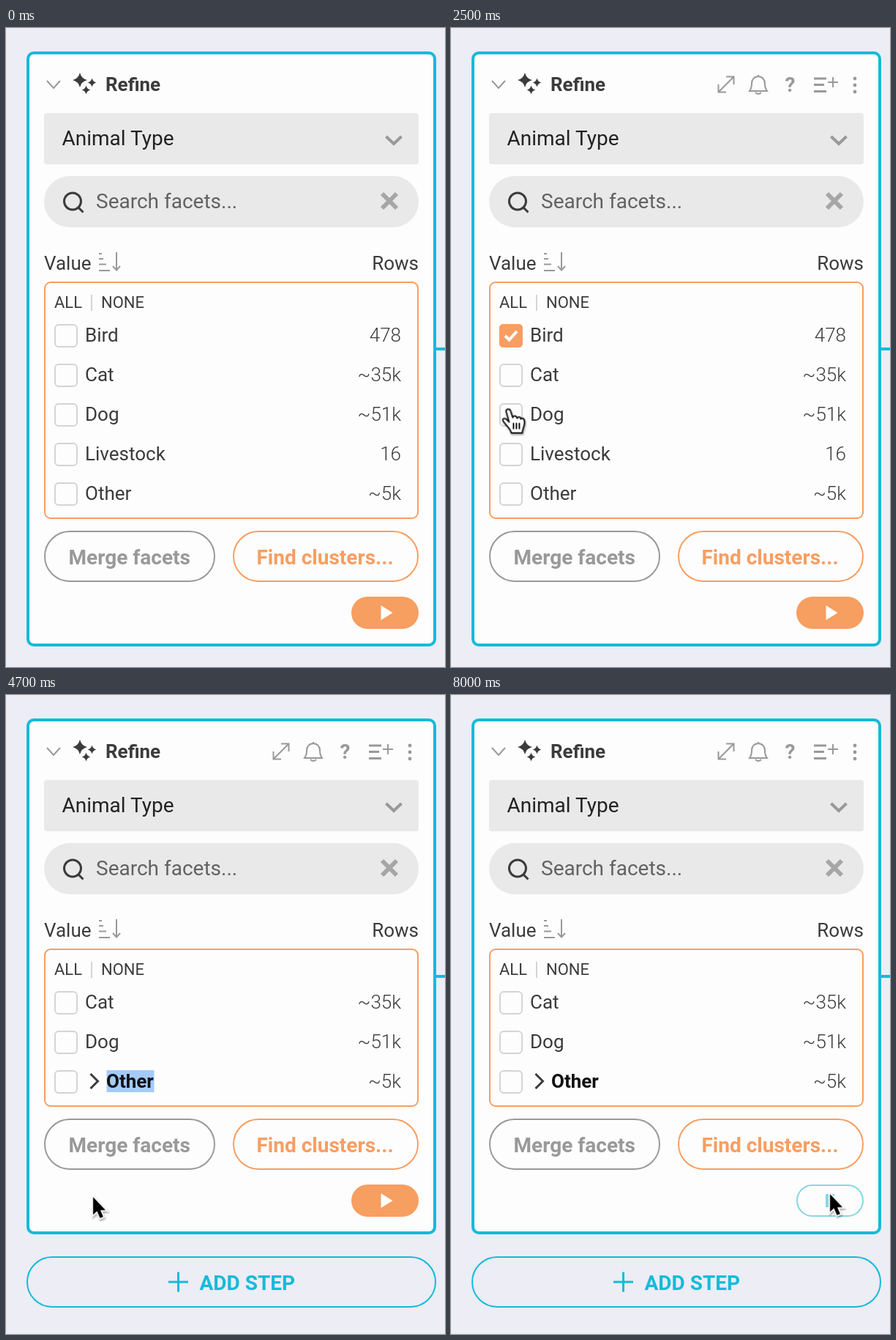
Write an HTML page that moves like this. It is 600 px wide and 872 px high and loops after 8100 ms.

```html
<!DOCTYPE html>
<html lang="en">
<head>
<meta charset="utf-8">
<title>Merging facets</title>
<style>
  :root {
    --page: #ecedf5; --card: #fdfdfd; --field: #e9e9e9;
    --cyan: #14bbd8; --orange: #f79e61; --gray: #999; --ink: #3b3b3b;
  }
  html, body { margin: 0; width: 100%; height: 100%; overflow: hidden; background: var(--page); }
  svg { display: block; width: 600px; height: 872px; }
  text { font: 400 26px Roboto, sans-serif; fill: var(--ink); }
  .big { font-size: 28px; }
  .small { font-size: 22px; }
  .bold { font-weight: 700; }
  .count { font-weight: 300; text-anchor: end; }
  .line { fill: none; stroke: var(--gray); stroke-width: 2; }
  .thick { stroke-width: 3; }
  .heavy { stroke-width: 4; }
  .orange { stroke: var(--orange); }
  .cyan { stroke: var(--cyan); }
  .dark { stroke: var(--ink); }
  .fill-orange { fill: var(--orange); }
  .fill-cyan { fill: var(--cyan); }
  .fill-gray { fill: var(--gray); }
  .fill-card { fill: var(--card); }

  /* Hard state changes, all on one clock */
  .step { animation: 8.1s step-end infinite; }
  .tools { animation-name: tools; }
  .bird { animation-name: bird; }
  .livestock { animation-name: livestock; }
  .other { animation-name: other; }
  .before { animation-name: before; }
  .after { animation-name: after; }
  .selection { animation-name: selection; }
  .hover { animation-name: hover; }
  .running { animation-name: running; }
  .hand { animation-name: hand; }
  .arrow { animation-name: arrow; }
  .frame { height: 808px; animation-name: frame; }
  .list { height: 322px; animation-name: list; }
  .footer { animation-name: footer; }
  .link { animation-name: link; }
  @keyframes tools { 0% { opacity: 0 } 8.6%, 100% { opacity: 1 } }
  @keyframes bird { 0% { opacity: 0 } 23.4%, 100% { opacity: 1 } }
  @keyframes livestock { 0% { opacity: 0 } 34.5% { opacity: 1 } 58%, 100% { opacity: 0 } }
  @keyframes other { 0% { opacity: 0 } 45.6%, 100% { opacity: 1 } }
  @keyframes before { 0% { opacity: 1 } 58%, 100% { opacity: 0 } }
  @keyframes after { 0% { opacity: 0 } 58%, 100% { opacity: 1 } }
  @keyframes selection { 0% { opacity: 0 } 58% { opacity: 1 } 70.3%, 100% { opacity: 0 } }
  @keyframes hover { 0% { opacity: 0 } 76.5% { opacity: 1 } 82.7%, 100% { opacity: 0 } }
  @keyframes running { 0% { opacity: 0 } 82.7%, 100% { opacity: 1 } }
  @keyframes hand {
    0% { opacity: 0 } 17.2% { opacity: 1 } 58% { opacity: 0 }
    76.5% { opacity: 1 } 82.7%, 100% { opacity: 0 }
  }
  @keyframes arrow {
    0% { opacity: 0 } 8.6% { opacity: 1 } 17.2% { opacity: 0 }
    58% { opacity: 1 } 76.5% { opacity: 0 } 82.7%, 100% { opacity: 1 }
  }
  @keyframes frame { 0% { height: 808px } 58%, 100% { height: 700px } }
  @keyframes list { 0% { height: 322px } 58%, 100% { height: 214px } }
  @keyframes footer { 0% { transform: none } 58%, 100% { transform: translateY(-108px) } }
  @keyframes link { 0% { transform: none } 58%, 100% { transform: translateY(-54px) } }

  .cursor {
    animation: travel 8.1s ease-in-out infinite;
    filter: drop-shadow(1px 2px 1px #0005);
  }
  @keyframes travel {
    0%, 8.6% { transform: translate(420px, 560px) }
    18.5%, 27.8% { transform: translate(75px, 425px) }
    33.3%, 38.9% { transform: translate(84px, 579px) }
    44.4%, 50% { transform: translate(85px, 641px) }
    54.3%, 70.3% { transform: translate(118px, 683px) }
    77.2%, 100% { transform: translate(517px, 679px) }
  }
</style>
</head>
<body>
<svg viewBox="0 0 600 872">
  <defs>
    <rect id="box" x="67" y="405" width="30" height="30" rx="5" fill="none" stroke="#d4d4d4" stroke-width="2"/>
    <g id="checked">
      <rect class="fill-orange" x="66" y="404" width="32" height="32" rx="5"/>
      <path d="M74 420l5.500 5.500L90 414" fill="none" stroke="#fff" stroke-width="4"/>
    </g>
    <path id="star" d="M0-10Q2-2 10 0Q2 2 0 10Q-2 2-10 0Q-2-2 0-10Z" fill="#3b3b3b"/>
  </defs>

  <path class="line heavy cyan step link" d="M586 438H600"/>
  <rect class="fill-card cyan heavy step frame" x="30" y="34" width="556" rx="8"/>

  <!-- Header -->
  <path class="line" d="M56 72l9 10 9-10"/>
  <use href="#star" transform="translate(101 71)"/>
  <use href="#star" transform="translate(117.500 74.500) scale(.6)"/>
  <use href="#star" transform="translate(109.500 84.500) scale(.6)"/>
  <text class="bold" x="136" y="86">Refine</text>
  <g class="line step tools">
    <path d="M365 88L387 66M376 66.500h10.500V77M365.500 77v10.500H376"/>
    <path d="M408 86q3-4 3-10q0-9 9-10q9 1 9 10q0 6 3 10zM420 66v-2M416 88q4 4 8 0"/>
    <path class="thick" d="M496 69h17M496 77.500h14M496 86.500h17"/>
    <path d="M522 67v14M515 74h14"/>
    <text class="bold big" x="456.500" y="87" style="fill:var(--gray)" stroke="none">?</text>
    <g class="fill-gray" stroke="none">
      <circle cx="552" cy="69" r="2.400"/>
      <circle cx="552" cy="78" r="2.400"/>
      <circle cx="552" cy="87" r="2.400"/>
    </g>
  </g>

  <!-- Fields -->
  <rect x="52" y="116" width="512" height="70" rx="4" fill="var(--field)"/>
  <text class="big" x="76.500" y="160" style="fill:#222">Animal Type</text>
  <path class="line heavy" d="M519.500 148l10.500 10 10.500-10"/>
  <rect x="52" y="202" width="512" height="70" rx="35" fill="var(--field)"/>
  <g class="line thick dark">
    <circle cx="91" cy="236.500" r="11.500"/>
    <path d="M99 245l6.500 6.500"/>
  </g>
  <text class="big" x="123" y="246" style="fill:#626262">Search facets...</text>
  <path d="M514 226l20 20M534 226l-20 20" stroke="#a6a6a6" stroke-width="6"/>

  <!-- Facet list -->
  <text x="52" y="330">Value</text>
  <path class="line" d="M127 308h4M127 315h6M127 322.500h10M127 331h15M151 306v24M146 325l5 5.500 5-5.500"/>
  <text x="564" y="330" text-anchor="end">Rows</text>
  <rect class="line orange step list" x="53" y="347" width="510" rx="8"/>
  <text class="small" x="66" y="382">ALL</text>
  <path d="M117 364v22" stroke="#d4d4d4" stroke-width="2"/>
  <text class="small" x="130" y="382">NONE</text>

  <g class="step before">
    <g>
      <use href="#box"/><use href="#checked" class="step bird"/>
      <text x="108" y="428">Bird</text><text class="count" x="540" y="428">478</text>
    </g>
    <g transform="translate(0 54)">
      <use href="#box"/>
      <text x="108" y="428">Cat</text><text class="count" x="540" y="428">~35k</text>
    </g>
    <g transform="translate(0 108)">
      <use href="#box"/>
      <text x="108" y="428">Dog</text><text class="count" x="540" y="428">~51k</text>
    </g>
    <g transform="translate(0 162)">
      <use href="#box"/><use href="#checked" class="step livestock"/>
      <text x="108" y="428">Livestock</text><text class="count" x="540" y="428">16</text>
    </g>
    <g transform="translate(0 216)">
      <use href="#box"/><use href="#checked" class="step other"/>
      <text x="108" y="428">Other</text><text class="count" x="540" y="428">~5k</text>
    </g>
  </g>

  <g class="step after">
    <g>
      <use href="#box"/>
      <text x="108" y="428">Cat</text><text class="count" x="540" y="428">~35k</text>
    </g>
    <g transform="translate(0 54)">
      <use href="#box"/>
      <text x="108" y="428">Dog</text><text class="count" x="540" y="428">~51k</text>
    </g>
    <g transform="translate(0 108)">
      <use href="#box"/>
      <path class="line thick dark" d="M115.500 409l10 10-10 10"/>
      <rect class="step selection" x="137.500" y="404" width="65" height="30" fill="#a3cbfa"/>
      <text class="bold" x="137" y="428" style="fill:#111">Other</text>
      <text class="count" x="540" y="428">~5k</text>
    </g>
  </g>

  <!-- Actions -->
  <g class="step footer">
    <rect class="line" x="53" y="687" width="232" height="68" rx="34"/>
    <text class="bold big" x="85.500" y="732" style="fill:var(--gray)">Merge facets</text>
    <g class="step livestock">
      <rect class="fill-orange" x="52" y="686" width="234" height="70" rx="35"/>
      <text class="bold big" x="85.500" y="732" style="fill:#fff">Merge facets</text>
    </g>
    <rect class="line orange" x="311" y="687" width="252" height="68" rx="34"/>
    <text class="bold big" x="342.500" y="732" style="fill:var(--orange)">Find clusters...</text>

    <rect class="fill-orange" x="472" y="776" width="92" height="44" rx="22"/>
    <rect class="step hover" x="472" y="776" width="92" height="44" rx="22" fill="#f9b283"/>
    <path d="M512.500 788l16 10-16 10z" fill="#fff"/>
    <g class="step running">
      <rect class="fill-card" x="472" y="776" width="92" height="44" rx="22"/>
      <rect x="473" y="777" width="90" height="42" rx="21" fill="none" stroke="#84d8e6" stroke-width="2"/>
      <path d="M514 789v18M522 789v18" stroke="#84d8e6" stroke-width="4"/>
    </g>

    <rect class="line cyan" x="29" y="875" width="558" height="68" rx="34"/>
    <path class="line thick cyan" d="M222 909h27M235.500 895.500v27"/>
    <text class="bold big" x="264.500" y="920" style="fill:var(--cyan)">ADD STEP</text>
  </g>

  <g class="cursor">
    <g class="step arrow">
      <path transform="translate(1 2) scale(.9)" d="M0 0V27L6 21.500L10.500 32L15.500 30L11 20H19Z" stroke="#fff" stroke-width="4" paint-order="stroke"/>
    </g>
    <g class="step hand">
      <g transform="translate(-2 2)" stroke="#111" stroke-width="2" stroke-linejoin="round" stroke-linecap="round">
        <path fill="#fff" d="M-3 4C-4 0 2-1 3 3L6 12C7 9 11 9 12 13C13 10 17 11 17 14C18 12 22 13 22 17C23 23 19 27 19 33H4C3 27-3 23-7 17C-9 13-5 12-2 15L1 18Z"/>
        <path d="M7 20v7M11 20v7M15 20v7"/>
      </g>
    </g>
  </g>
</svg>
</body>
</html>
```
